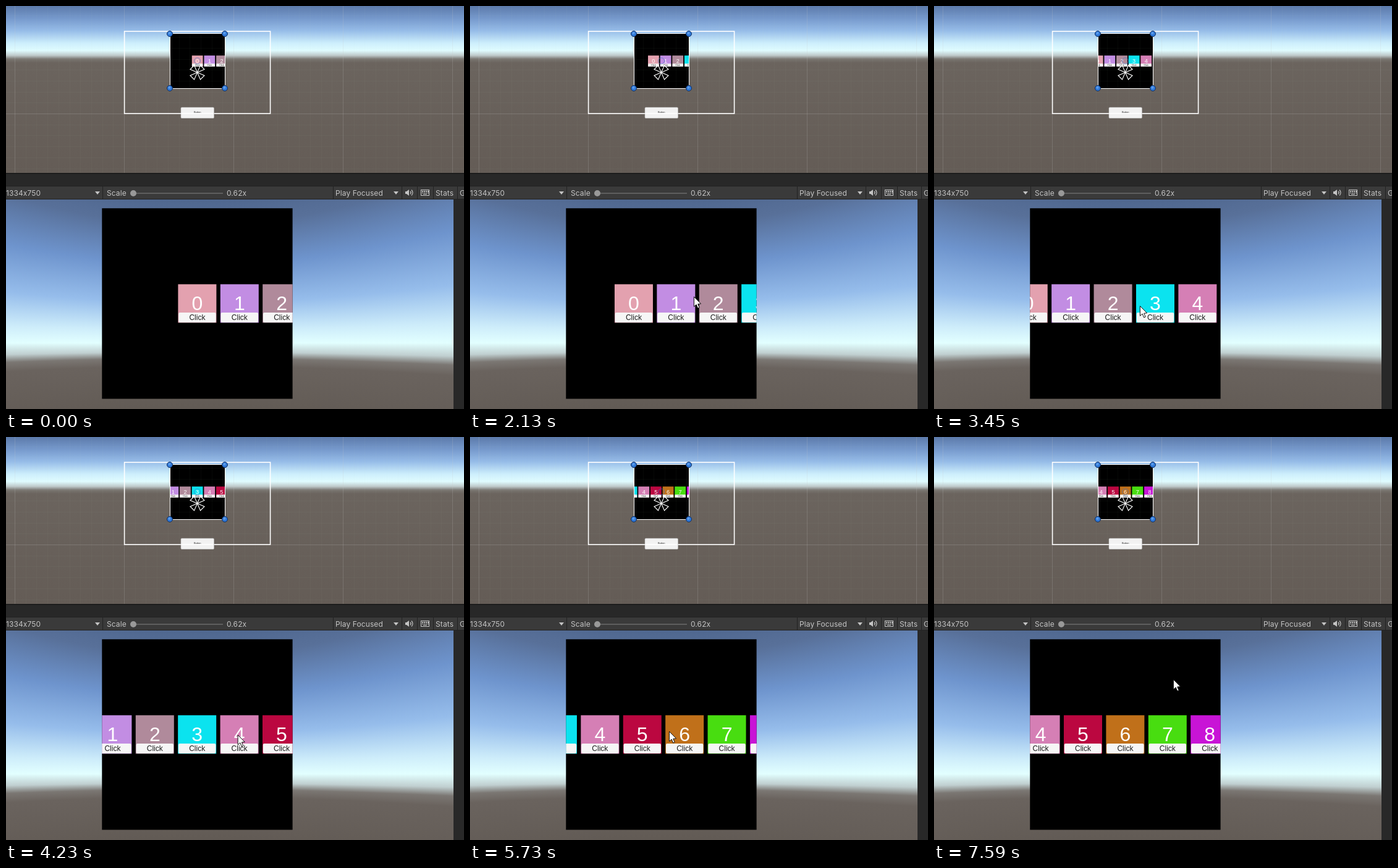
An HTML page with a canvas for the animation above (8000 ms loop, 741 by 652 pixels).

```html
<!DOCTYPE html>
<html lang="en">
<head>
<meta charset="utf-8">
<title>Snapping card scroller</title>
<style>
html, body { margin: 0; width: 100%; height: 100%; overflow: hidden; background: #282828; }
canvas { display: block; }
</style>
</head>
<body>
<canvas id="stage" width="741" height="652"></canvas>
<script>
const W = 741, H = 652, LOOP = 8000, STEP = 30, PITCH = 68.4;
const CARDS = ['#e3a1af', '#c28de3', '#b08a9b', '#0be3ef', '#d57fb5', '#bb0740', '#c0701a', '#48dd10', '#c814d6'];
const stage = document.getElementById('stage').getContext('2d');
const backdrop = document.createElement('canvas');
backdrop.width = W;
backdrop.height = H;

// Sky stops: distance from the horizon, colour
const SCENE_SKY = [[-72, '#5c7aaa'], [-52, '#7699cc'], [-32, '#96bce8'], [-12, '#cdeefc'], [0, '#e0fcff'],
  [8, '#bec9ca'], [14, '#78746f'], [20, '#6b645e'], [200, '#645c56']];
const GAME_SKY = [[-232, '#4f678f'], [-190, '#587099'], [-126, '#6e94cd'], [-65, '#96bdeb'], [-22, '#cdecfa'],
  [0, '#e2ffff'], [15, '#c0cfd0'], [25, '#7b7773'], [37, '#6a635e'], [120, '#605953']];

// Pointer path: time, x, y, and 1 where it arrives at an even speed
const PATH = [[630, 728, 153], [900, 413, 438], [1050, 482, 418], [1200, 482, 418], [1530, 425, 470],
  [1680, 425, 470], [2130, 362, 470, 1], [2490, 362, 470], [2760, 408, 495], [3030, 440, 488],
  [3180, 440, 488], [3450, 333, 485, 1], [3990, 333, 485], [4530, 433, 477], [4680, 433, 477],
  [5100, 322, 476, 1], [6570, 322, 476], [6810, 305, 476], [7320, 305, 476], [7590, 387, 392]];

// Flicks, measured in cards: drag, glide with friction, then snap
const FLICKS = [
  { start: 1680, release: 2130, from: 0, at: 0.65, speed: 1.46, to: 1 },
  { start: 3180, release: 3450, from: 1, at: 2.29, speed: 2.18, to: 3 },
  { start: 4680, release: 5100, from: 3, at: 4.37, speed: 3.01, to: 6 }
];
const SNAP_SPEED = 0.67, FRICTION = 2, SNAP_RATE = 14, DRAG_SLACK = 18;

const clamp = v => Math.min(1, Math.max(0, v));

function pointer(t) {
  if (t < PATH[0][0]) return null;
  const i = PATH.findIndex(p => p[0] > t);
  if (i < 0) return PATH[PATH.length - 1].slice(1, 3);
  const [t0, x0, y0] = PATH[i - 1], [t1, x1, y1, even] = PATH[i];
  let u = (t - t0) / (t1 - t0);
  if (!even) u = u * u * (3 - 2 * u);
  return [x0 + (x1 - x0) * u, y0 + (y1 - y0) * u];
}

function scroll(t) {
  const f = FLICKS.filter(k => k.start <= t).pop();
  if (!f) return 0;
  if (t < f.release) {
    const first = pointer(f.start)[0] - DRAG_SLACK, last = pointer(f.release)[0];
    return f.from + (f.at - f.from) * clamp((first - pointer(t)[0]) / (first - last));
  }
  const time = (t - f.release) / 1000;
  const glideEnd = Math.log(f.speed / SNAP_SPEED) / FRICTION;
  const glide = s => f.at + f.speed / FRICTION * (1 - Math.exp(-FRICTION * s));
  if (time < glideEnd) return glide(time);
  return f.to + (glide(glideEnd) - f.to) * Math.exp(-SNAP_RATE * (time - glideEnd));
}

function rect(c, x, y, w, h, fill) {
  c.fillStyle = fill;
  c.fillRect(x, y, w, h);
}

function poly(c, points, fill, stroke, width = 1) {
  c.beginPath();
  points.forEach(([x, y]) => c.lineTo(x, y));
  c.closePath();
  if (fill) { c.fillStyle = fill; c.fill(); }
  if (stroke) { c.strokeStyle = stroke; c.lineWidth = width; c.stroke(); }
}

function disc(c, x, y, r, fill, stroke) {
  c.beginPath();
  c.arc(x, y, r, 0, 7);
  if (fill) { c.fillStyle = fill; c.fill(); }
  if (stroke) { c.strokeStyle = stroke; c.lineWidth = 1; c.stroke(); }
}

function text(c, str, x, y, font, fill, align = 'left') {
  c.font = font;
  c.fillStyle = fill;
  c.textAlign = align;
  c.fillText(str, x, y);
}

function sky(c, stops, top, width, height, horizon, centre, focal) {
  const low = stops[0][0], span = stops[stops.length - 1][0] - low;
  const g = c.createLinearGradient(0, low, 0, low + span);
  stops.forEach(([d, colour]) => g.addColorStop((d - low) / span, colour));
  c.save();
  c.beginPath();
  c.rect(0, top, width, height);
  c.clip();
  c.fillStyle = g;
  for (let x = 0; x < width; x++) {
    c.setTransform(1, 0, 0, Math.hypot(1, (x - centre) / focal), 0, horizon);
    c.fillRect(x, -400, 1, 800);
  }
  c.restore();
}

function grid(c) {
  for (let i = 0; i < 42; i++) {
    const x = Math.round(14 + i * 17.7);
    rect(c, x, 0, 1, 270, i % 10 ? 'rgba(190,210,200,.035)' : 'rgba(200,200,200,.2)');
  }
  for (let i = -9; i < 6; i++) {
    rect(c, 0, Math.round(174 + i * 17.7), W, 1, i ? 'rgba(190,210,200,.035)' : 'rgba(200,200,200,.22)');
  }
}

function toolbar(c) {
  rect(c, 0, 270, W, 22, '#282828');
  rect(c, 0, 270, W, 2, '#1c1c1c');
  rect(c, 0, 291, W, 22, '#232323');
  rect(c, 0, 292, W, 20, '#3a3a3a');
  [156, 529, 640, 665, 691, 730].forEach(x => rect(c, x, 292, 1, 20, '#222'));
  const label = (str, x) => text(c, str, x, 307, '12px Inter, sans-serif', '#c4c4c4');
  c.letterSpacing = '0.1px';
  label('1334x750', 0);
  label('Scale', 163);
  label('0.62x', 357);
  label('Play Focused', 533);
  label('Stats', 695);
  label('G', 734);
  c.letterSpacing = '0px';
  [148, 631].forEach(x => poly(c, [[x - 4, 300], [x + 4, 300], [x, 305]], '#c4c4c4'));
  rect(c, 206, 302, 145, 2, '#5e5e5e');
  disc(c, 206, 303, 5, '#999');
  poly(c, [[646, 300], [648, 300], [652, 297], [652, 307], [648, 304], [646, 304]], '#c4c4c4');
  c.strokeStyle = '#c4c4c4';
  c.lineWidth = 1.2;
  [3, 6].forEach(r => {
    c.beginPath();
    c.arc(652, 302, r, -0.85, 0.85);
    c.stroke();
  });
  c.lineWidth = 1;
  c.strokeRect(671.5, 297.5, 13, 9);
  for (let i = 0; i < 4; i++) {
    rect(c, 673 + i * 3, 299, 2, 2, '#c4c4c4');
    rect(c, 673 + i * 3, 302, 2, 1, '#c4c4c4');
  }
  rect(c, 675, 304, 6, 1, '#c4c4c4');
}

function paintBackdrop() {
  const c = backdrop.getContext('2d');
  rect(c, 0, 0, W, H, '#282828');
  sky(c, SCENE_SKY, 0, W, 270, 72, 370, Infinity);
  grid(c);
  toolbar(c);
  sky(c, GAME_SKY, 313, 724, 339, 545, 309, 402);
}

function panel(c, pos) {
  c.save();
  c.beginPath();
  c.rect(155.3, 327.2, 308.3, 308.3);
  c.clip();
  rect(c, 155, 327, 309, 309, '#000');
  CARDS.forEach((colour, i) => {
    const x = 278.4 + (i - pos) * PITCH;
    if (x < 90 || x > 464) return;
    rect(c, x, 450.2, 62, 62.2, colour);
    text(c, i, x + 31, 492, '32px "Liberation Sans", Arial, sans-serif', '#fff', 'center');
    c.beginPath();
    c.roundRect(x + 0.8, 496, 60.4, 16, 2);
    c.fillStyle = '#f6f6f6';
    c.fill();
    text(c, 'Click', x + 31, 508, '12px "Liberation Sans", Arial, sans-serif', '#1c1c1c', 'center');
  });
  c.restore();
}

function sceneView(c, pos) {
  const scale = 0.2873;
  c.save();
  c.translate(265.4 - 155.3 * scale, 44.8 - 327.2 * scale);
  c.scale(scale, scale);
  panel(c, pos);
  c.restore();
  c.save();
  c.beginPath();
  c.rect(266, 45, 88, 88);
  c.clip();
  grid(c);
  c.restore();

  c.strokeStyle = '#fff';
  c.lineWidth = 1.6;
  c.strokeRect(191.6, 41, 236, 133);
  c.lineWidth = 1;
  c.strokeRect(265.5, 44.5, 89, 89);
  c.beginPath();
  c.roundRect(283, 164, 53.5, 17.5, 1.5);
  c.fillStyle = '#f2f2f2';
  c.fill();
  c.strokeStyle = '#bbb';
  c.lineWidth = 0.6;
  c.stroke();
  rect(c, 283, 173, 53, 1.6, '#fff');
  text(c, 'Button', 309.7, 173, '4px "Liberation Sans", Arial, sans-serif', '#222', 'center');

  disc(c, 309.5, 88.8, 5, null, 'rgba(70,120,200,.65)');
  for (const sx of [-1, 1]) for (const sy of [-1, 1]) {
    poly(c, [[309.5, 107.5], [309.5 + sx * 11.5, 107.5 + sy * 5], [309.5 + sx * 5, 107.5 + sy * 11.5]], null, '#fff', 1.1);
    disc(c, 309.5 + sx * 44.5, 89 + sy * 44, 4.5, '#2f78d8', '#102c5c');
    disc(c, 309 + sx * 44.5, 88 + sy * 44, 2, '#5a9cec');
  }
}

function arrow(c, [x, y]) {
  const shape = [[0, 0], [0, 16], [3.7, 12.6], [6.3, 18.6], [8.8, 17.5], [6.3, 11.8], [11.2, 11.4]];
  poly(c, shape.map(([dx, dy]) => [x + 0.4 + dx, y + 0.4 + dy]), '#fff', '#111', 1);
}

function draw(t) {
  stage.drawImage(backdrop, 0, 0);
  const pos = scroll(t), tip = pointer(t);
  sceneView(stage, pos);
  panel(stage, pos);
  if (tip) arrow(stage, tip);
}

function frame(now) {
  const t = now % LOOP;
  draw(t - t % STEP);
  requestAnimationFrame(frame);
}

paintBackdrop();
requestAnimationFrame(frame);
</script>
</body>
</html>
```
